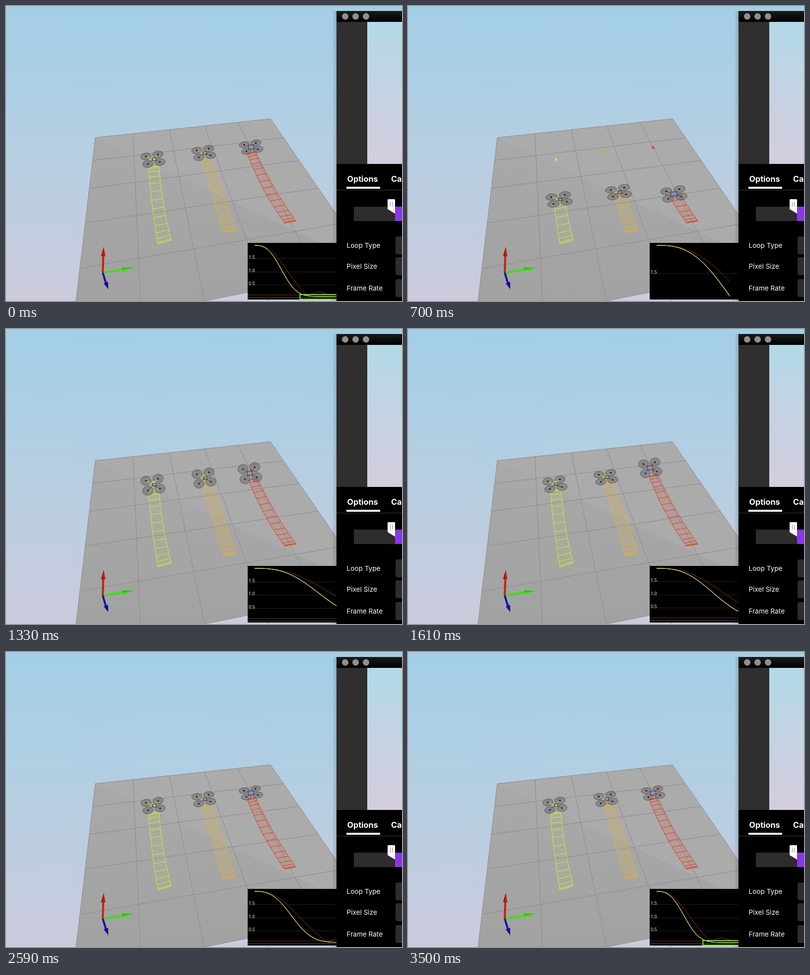
An HTML page with a canvas that plays this animation: 798 by 594 pixels, repeating every 3570 ms.

```html
<!DOCTYPE html>
<html>
<head>
<meta charset="utf-8">
<style>
html, body { margin: 0; width: 100%; height: 100%; overflow: hidden; }
canvas { display: block; width: 798px; height: 594px; }
</style>
</head>
<body>
<canvas id="stage" width="798" height="594"></canvas>
<script>
const ctx = document.getElementById('stage').getContext('2d');
const LOOP = 3570, STEP = 70;
const KEYS = [70, 350, 1050, 1610, 2240, 3570];
const ZOOM = [1, 1, 1, 1.31, 1.74, 2.75];

// span: time to reach the goal; dx, dy: drone offset from the ribbon head; tilt: rotor disc height
const drones = [
  { color: '#c6f22e', fill: 'rgba(198,242,46,.06)', goal: [299, 309], span: 1.71, body: 1,
    left: [[306, 479], [292.5, 398], [287, 325]], right: [[333, 471], [313.5, 396], [308, 322]],
    dx: [0, 0, -1, -1.5, -1, -1.5], dy: [-5, 2, -9, -11, -14, -15], tilt: [6.5, 1.8, 12.2, 7.7, 7.6, 7.6] },
  { color: '#e3b22c', fill: 'rgba(232,182,42,.12)', goal: [399, 297], span: 1.71, body: 1,
    left: [[438, 456], [416, 382], [394, 309]], right: [[463, 452], [438, 378], [413, 306]],
    dx: [0, 2, -4, -5, -5, -5], dy: [-4, 5, -6, -9, -11, -11.5], tilt: [6.5, 1.8, 12, 7.1, 7, 7] },
  { color: '#d8401f', fill: 'rgba(225,75,50,.16)', goal: [494, 285], span: 2.1, body: 1.5,
    left: [[561, 437], [512, 367], [486, 297]], right: [[584, 433], [534.5, 363], [503, 293]],
    dx: [0, 3, -6, -6.5, -1, -.5], dy: [-4, 5, -9, -15.5, -11.5, -11], tilt: [6.5, 4.2, 11, 9.4, 6.3, 6.6] }
];

const smooth = x => x * x * (3 - 2 * x);

function keyed(t, values) {
  let i = 0;
  while (i < KEYS.length - 2 && t > KEYS[i + 1]) i++;
  return values[i] + (values[i + 1] - values[i]) * (t - KEYS[i]) / (KEYS[i + 1] - KEYS[i]);
}

function bezier([a, b, c], s) {
  return [0, 1].map(k => (1 - s) ** 2 * a[k] + 2 * s * (1 - s) * b[k] + s * s * c[k]);
}

function rect(x, y, w, h, fill) {
  ctx.fillStyle = fill;
  ctx.fillRect(x, y, w, h);
}

function path(points, stroke, width = 1, fill) {
  ctx.beginPath();
  points.forEach(p => ctx.lineTo(p[0], p[1]));
  if (fill) { ctx.closePath(); ctx.fillStyle = fill; ctx.fill(); }
  if (stroke) { ctx.strokeStyle = stroke; ctx.lineWidth = width; ctx.stroke(); }
}

function ellipse(x, y, rx, ry, fill, stroke) {
  ctx.beginPath();
  ctx.ellipse(x, y, rx, ry, -.12, 0, 7);
  ctx.fillStyle = fill;
  ctx.fill();
  if (stroke) { ctx.strokeStyle = stroke; ctx.lineWidth = 1; ctx.stroke(); }
}

function text(string, x, y, font) {
  ctx.font = font;
  ctx.fillStyle = '#fff';
  ctx.fillText(string, x, y);
}

function gradient(x0, y0, x1, y1, ...colors) {
  const g = ctx.createLinearGradient(x0, y0, x1, y1);
  colors.forEach((c, i) => g.addColorStop(i / (colors.length - 1), c));
  return g;
}

function arrow(tip, base, color, dark) {
  const [ox, oy] = [195, 537];
  const len = Math.hypot(tip[0] - ox, tip[1] - oy);
  const nx = (oy - tip[1]) / len * 4.5, ny = (tip[0] - ox) / len * 4.5;
  path([[ox, oy], base], color, 4);
  path([[base[0] + nx, base[1] + ny], tip, [base[0] - nx, base[1] - ny]], null, 0, color);
  path([[base[0] - nx, base[1] - ny], tip, base], null, 0, dark);
}

function drawFloor() {
  rect(0, 0, 798, 594, gradient(0, 0, 0, 594, '#a2cfe6', '#b6cee2', '#cccbdd'));
  const corners = [[180, 265], [533, 227], [739, 526], [135, 647]];
  path(corners, null, 0, '#ababab');
  path([corners[0], corners[2], corners[3]], null, 0, gradient(0, 265, 0, 594, '#a9a9a9', '#a2a2a2'));
  const line = '#8b8b8b';
  // columns meet at (235.7, -204.6), rows at (4186, -166)
  for (const [x, y] of [[180, 265], [256, 257], [329, 249], [400, 241], [467, 234], [533, 227]]) {
    const m = (x - 235.7) / (y + 204.6);
    path([[x, y], [235.7 + m * 798.6, 594]], line);
  }
  for (const [x, y] of [[180, 265], [174, 311], [168, 367], [160, 437], [151, 528], [136, 647]]) {
    const m = (-166 - y) / (4186 - x);
    const right = (y - m * x + m * 376.6) / (1 - m * .689);
    path([[x, y], [376.6 + .689 * right, right]], line);
  }
  arrow([258, 527], [234, 531], '#3fe012', '#2fbf0c');
  arrow([206, 570], [201, 557], '#1212b4', '#0b0b88');
  arrow([197, 485], [196, 504], '#c8200c', '#a81a08');
}

function drawRibbon(d, f) {
  const rungs = Math.round(d.span * 7.6), ticks = [];
  for (let i = 0; i < f * rungs; i++) ticks.push(smooth(i / rungs));
  ticks.push(smooth(f));
  const left = ticks.map(s => bezier(d.left, s));
  const right = ticks.map(s => bezier(d.right, s));
  path([...left, ...right.slice().reverse()], d.color, 1, d.fill);
  left.forEach((p, i) => path([p, right[i]], d.color));
}

function drawDrone(d, t, f) {
  const s = smooth(f), l = bezier(d.left, s), r = bezier(d.right, s);
  const x = (l[0] + r[0]) / 2 + keyed(t, d.dx);
  const y = (l[1] + r[1]) / 2 + keyed(t, d.dy);
  const k = 1 + (y - 300) * .0014;
  const by = keyed(t, d.tilt), bx = 2 + Math.max(0, 7 - by) * .5;
  const rotors = [];
  for (const j of [-1, 1])
    for (const i of [-1, 1])
      rotors.push([x + i * 12 * k + j * bx, y - i * 2 * k + j * by, j]);
  for (const p of rotors) ellipse(p[0], p[1], 10.4 * k, Math.max(2.5, by * .92), 'rgba(95,95,95,.45)', '#5a5a5a');
  for (const p of rotors) {
    path([[x, y], p], p[2] < 0 ? d.color : '#55555c');
    ellipse(p[0], p[1], 1.7, 1.7, p[2] < 0 ? '#1c1c1c' : '#20204c');
  }
  const [gx, gy] = d.goal;
  path([[gx - 3, gy - 2], [gx + 1, gy - 3], [gx + 3, gy + 2], [gx - 1, gy + 3]], null, 0, d.color);
  const w = 4 * d.body * k, h = Math.max(3, by * .3) * d.body, cx = x + (d.body > 1 ? 0 : 2.5);
  path([[cx - w, y - h + 1], [cx + w - 1, y - h], [cx + w, y + h - 1], [cx - w + 1, y + h], [cx - w, y - h + 1]],
    '#33334a', 1.2, d.body > 1 || f < 1 ? '#938fbb' : 'rgba(147,143,187,.1)');
}

// distance to the goal over time
const plain = k => u => .04 + 1.96 * Math.exp(-k * u ** 2.8);
const overshoot = u => Math.hypot(2 * Math.exp(-.53 * u ** 2.6) - .25 * Math.exp(-(((u - 2.05) / .4) ** 2)), .09);
const curves = [[overshoot, '#9c3022'], [plain(.85), '#f2d84a'], [plain(.87), '#dcf86a']];

function drawGraph(t, u) {
  ctx.save();
  ctx.beginPath();
  ctx.rect(487, 477, 311, 114);
  ctx.clip();
  rect(487, 477, 311, 114, '#000');
  const range = Math.max(.004, 2 - curves[2][0](u));
  const scale = 103 / range;
  const px = v => 501 + 165 * v / keyed(t, ZOOM);
  const py = v => 482 + (2 - v) * scale;
  const step = [.002, .005, .01, .02, .05, .1, .2, .5].find(s => s * scale >= 25) || .5;
  for (let i = 1; i * step < Math.min(range, 1.9); i++) {
    const v = 2 - i * step, y = Math.round(py(v)) + .5;
    path([[487, y], [798, y]], '#222');
    text(v.toFixed(step < .01 ? 3 : step < .1 ? 2 : 1), 489, y + .5, '9px "Open Sans", sans-serif');
  }
  path([[487, py(0)], [798, py(0)]], '#5a5a5a');
  path([[487, py(.1)], [798, py(.1)]], '#8e2222');
  for (const [value, color] of curves) {
    const points = [];
    for (let i = 0; i <= 120; i++) points.push([px(u * i / 120), py(value(u * i / 120))]);
    path(points, color);
  }
  if (t >= 3430) {
    ctx.strokeStyle = '#62f52c';
    ctx.lineWidth = 2;
    ctx.strokeRect(px(1.525), 581, 300, 9.5);
  }
  ctx.restore();
}

function drawPanel() {
  rect(657, 10, 9, 584, gradient(657, 0, 666, 0, 'rgba(0,0,0,0)', 'rgba(0,0,0,.16)'));
  rect(666, 10, 132, 584, '#000');
  rect(666, 10, 132, 22, gradient(0, 10, 0, 32, '#1c1c1c', '#000'));
  for (const x of [683.5, 704.5, 725.5]) ellipse(x, 21, 6.5, 6.5, '#8f8f8f');
  rect(666, 32, 62, 286, '#302e2f');
  rect(728, 32, 70, 286, gradient(0, 32, 0, 318, '#b2d9e7', '#c5d3e3', '#d5cddf'));
  const bold = '700 16.2px Inter, sans-serif';
  text('Options', 687.5, 353.5, bold);
  text('Capture', 776, 353.5, bold);
  rect(666, 370, 132, 1, '#3c3c3c');
  rect(686, 364, 68, 4, '#fff');
  rect(701, 404, 83, 29, '#2e2c2d');
  rect(784, 404, 14, 29, '#8b35ea');
  path([[769, 390], [770, 389], [783, 389], [784, 390], [784, 418], [769, 409]], null, 0, '#fff');
  rect(774, 394, 1, 10, '#888');
  rect(778, 394, 1, 10, '#888');
  [['Loop Type', 487, 464], ['Pixel Size', 529, 506], ['Frame Rate', 573, 550]].forEach(([label, y, top]) => {
    text(label, 686.5, y, '13.6px Inter, sans-serif');
    ctx.beginPath();
    ctx.roundRect(785, top, 30, 36, 4);
    ctx.fillStyle = '#2e2c2d';
    ctx.fill();
  });
}

function draw(now) {
  const t = Math.floor(now % LOOP / STEP) * STEP || LOOP;
  const u = Math.max(0, (t - 80) / 693);
  drawFloor();
  for (const d of drones) {
    const f = Math.min(1, u / d.span);
    drawRibbon(d, f);
    drawDrone(d, t, f);
  }
  drawGraph(t, u);
  drawPanel();
}

const start = performance.now();
function tick() {
  draw(performance.now() - start);
  requestAnimationFrame(tick);
}
tick();
</script>
</body>
</html>
```
